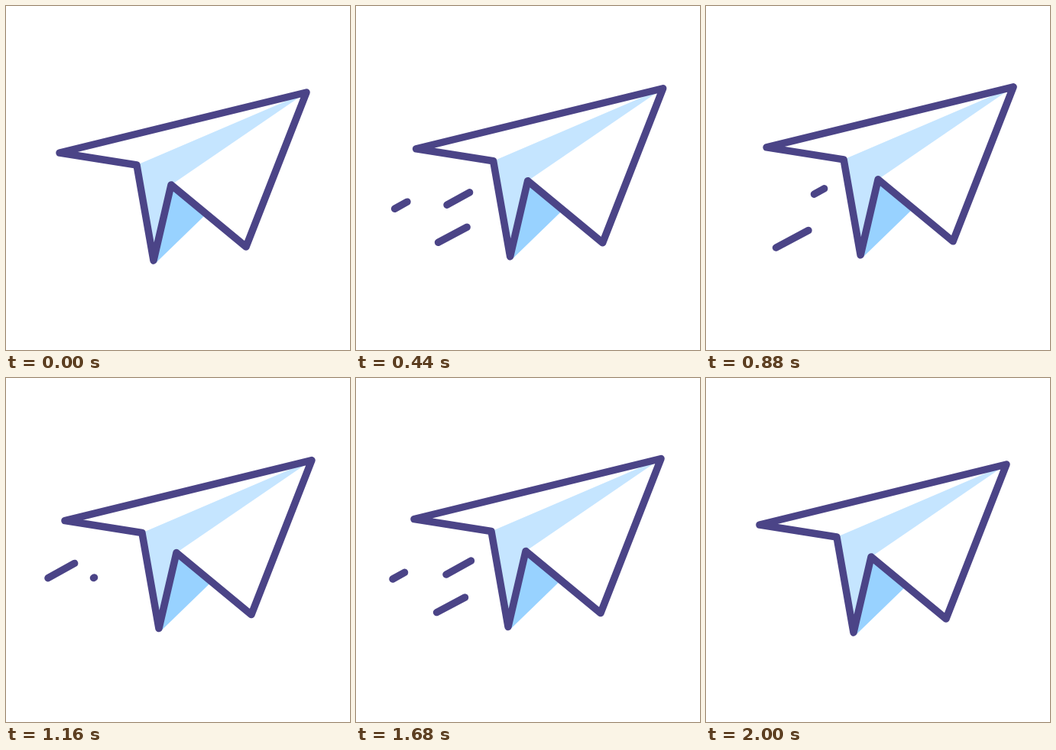
An HTML page that plays this animation: 450 px wide and 450 px high, repeating every 2.04 s.

```html
<!DOCTYPE html>
<html lang="en">
<head>
<meta charset="utf-8">
<title>Paper plane</title>
<style>
  html, body { margin: 0; width: 100%; height: 100%; overflow: hidden; background: #fff; }
  svg { display: block; width: 100vw; height: 100vh; }
</style>
</head>
<body>
<svg viewBox="0 0 450 450">
  <g id="plane" stroke-linecap="round" stroke-linejoin="round">
    <path fill="#c5e5ff" d="M393 113 171 208 193 333 216 234Z"/>
    <path fill="#98d2ff" d="M216 234 262 272 195 337 193 333Z"/>
    <path fill="none" stroke="#4b4487" stroke-width="9.5"
      d="M393 113 70 192 171 208 193 333 216 234 314 315Z"/>
    <path id="trails" fill="none" stroke="#4b4487" stroke-width="9.5"/>
  </g>
</svg>
<script>
const LOOP = 2040, STEP = 40;
const plane = document.getElementById('plane');
const trails = document.getElementById('trails');

// Plane offsets: [time, x, y]
const bob = [
  [0, 0, 0], [360, 11.5, -7], [600, 0, 0], [1000, 11.5, -9],
  [1370, 0, 0], [1680, 6, -7.5], [2000, 0, 0], [LOOP, 0, 0]
];

// Each streak runs along a track; head and tail are time spans after a start
const streaks = [
  { from: [87, 245.5], to: [42, 270.5], head: [0, 210], tail: [75, 500], starts: [115, 1000, 1350] },
  { from: [145.5, 246], to: [107.5, 267], head: [0, 450], tail: [335, 475], starts: [70, 700, 1330] },
  { from: [136.5, 294.5], to: [80, 324.5], head: [0, 392], tail: [280, 480], starts: [202, 540, 1445] }
];

const ease = p => (1 - Math.cos(Math.PI * Math.min(1, Math.max(0, p)))) / 2;
const span = (t, [a, b]) => ease((t - a) / (b - a));
const mix = (a, b, p) => a + (b - a) * p;

function offset(t) {
  const i = bob.findIndex(key => key[0] > t);
  const a = bob[i - 1], b = bob[i];
  const p = span(t, [a[0], b[0]]);
  return [mix(a[1], b[1], p), mix(a[2], b[2], p)];
}

function streakPath({ from, to, head, tail, starts }, t) {
  const point = p => from.map((v, i) => mix(v, to[i], p).toFixed(2)).join(' ');
  return starts
    .map(start => t - start)
    .filter(age => age > 0 && age < tail[1])
    .map(age => `M${point(span(age, tail))}L${point(span(age, head))}`)
    .join('');
}

function draw(now) {
  const t = Math.floor(now % LOOP / STEP) * STEP;
  plane.setAttribute('transform', `translate(${offset(t)})`);
  trails.setAttribute('d', streaks.map(s => streakPath(s, t)).join(''));
  requestAnimationFrame(draw);
}
draw(0);
</script>
</body>
</html>
```
